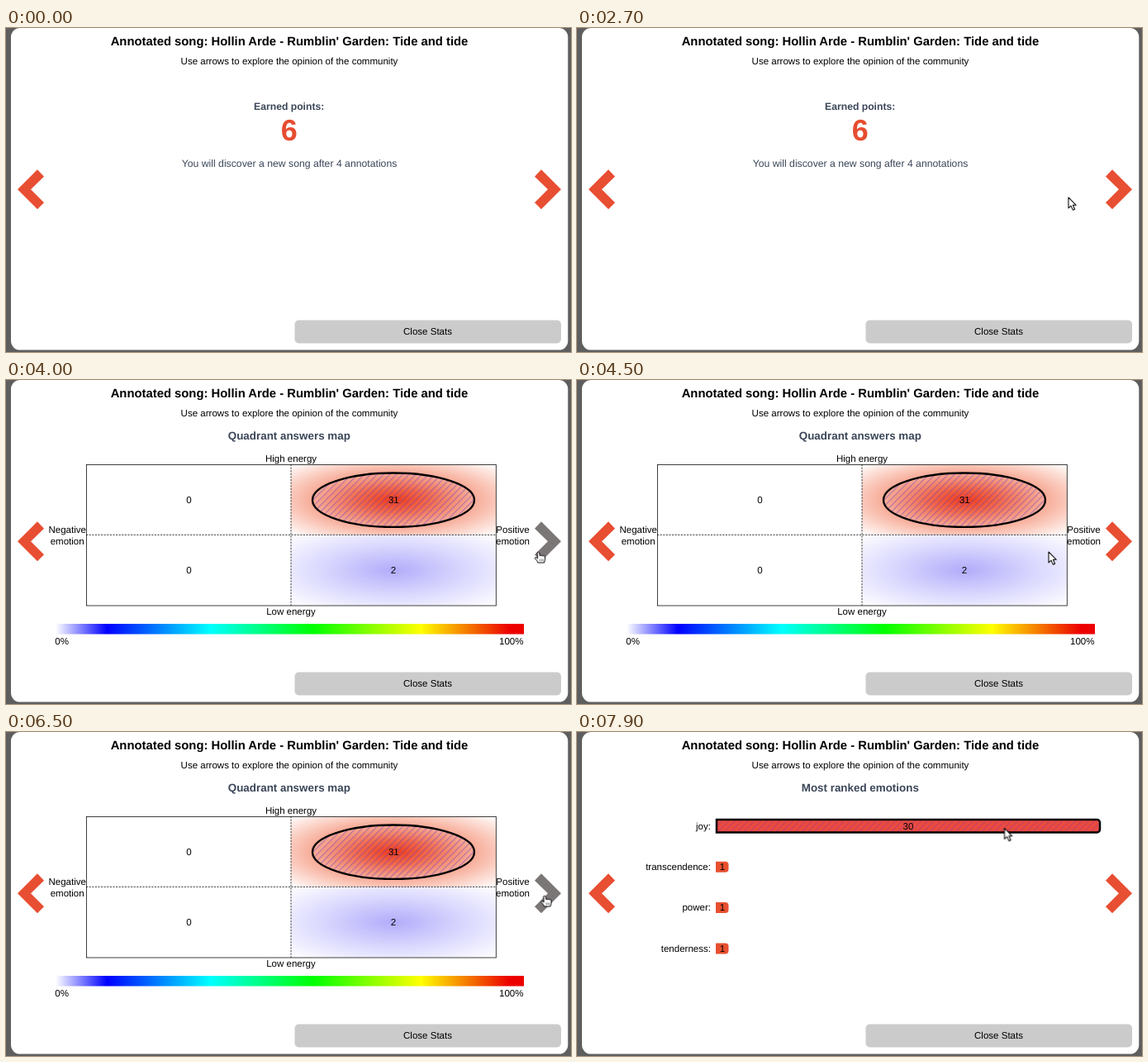
These frames come from a looping animation (684 by 392 pixels, 8 s). An HTML page:

```html
<!DOCTYPE html>
<html lang="en">
<head>
<meta charset="utf-8">
<title>Annotation stats</title>
<style>
  html, body { margin: 0; width: 100%; height: 100%; overflow: hidden; background: #5e5e5e; }
  svg { display: block; width: 684px; height: 392px; }
  text {
    font: 11.54px "Liberation Sans", Arial, sans-serif;
    text-anchor: middle;
    text-rendering: geometricPrecision;
  }
  .title { font-size: 14.83px; font-weight: bold; }
  .heading { font-size: 13.4px; font-weight: bold; fill: #3b4658; }
  .label { font-size: 12.2px; font-weight: bold; fill: #3b4658; }
  .note { font-size: 12.24px; fill: #3b4658; }
  .points { font-size: 36px; font-weight: bold; fill: #e64d30; }
  .end { text-anchor: end; }
  .start { text-anchor: start; }
  .chevron { fill: #e84e32; }
  .bar { fill: #e8502f; }

  /* Hard switches: slides, hover colour, pointer shape */
  .next, .slide, .pointer, .arrow, .hand { animation: 8s step-end infinite; }
  .slide { opacity: 0; }
  .points-slide { animation-name: points; }
  .map-slide { animation-name: map; }
  .rank-slide { animation-name: rank; }
  .next { animation-name: hover; }
  .pointer { animation-name: appear; }
  .arrow { animation-name: arrow; }
  .hand { animation-name: hand; }
  .path { animation: move 8s linear infinite; }

  @keyframes points { 0% { opacity: 1 } 50%, 100% { opacity: 0 } }
  @keyframes map { 0% { opacity: 0 } 50% { opacity: 1 } 83.75%, 100% { opacity: 0 } }
  @keyframes rank { 0% { opacity: 0 } 83.75%, 100% { opacity: 1 } }
  @keyframes appear { 0% { opacity: 0 } 27.5%, 100% { opacity: 1 } }
  @keyframes hover {
    0%, 53.75%, 88.75%, 100% { fill: #e84e32 }
    41.25%, 76.25% { fill: #7b7776 }
  }
  @keyframes arrow {
    0%, 53.75%, 88.75%, 100% { opacity: 1 }
    41.25%, 76.25% { opacity: 0 }
  }
  @keyframes hand {
    0%, 53.75%, 88.75%, 100% { opacity: 0 }
    41.25%, 76.25% { opacity: 1 }
  }
  @keyframes move {
    0%, 27.5% { transform: translate(560px, 248px) }
    32.5%, 35% { transform: translate(595px, 205px) }
    42.5%, 52.5% { transform: translate(644.5px, 208px) }
    56.25%, 71.25% { transform: translate(571px, 208px) }
    77.5%, 87.5% { transform: translate(652px, 198px) }
    90% { transform: translate(632px, 185px) }
    97.5%, 100% { transform: translate(517.5px, 116.5px) }
  }
</style>
</head>
<body>
<svg viewBox="0 0 684 392">
  <defs>
    <radialGradient id="hot" r=".707">
      <stop offset="0" stop-color="#ee3c1c"/>
      <stop offset=".25" stop-color="#f26a4c"/>
      <stop offset=".5" stop-color="#f6a18b"/>
      <stop offset=".75" stop-color="#fbd0c4"/>
      <stop offset="1" stop-color="#fff"/>
    </radialGradient>
    <radialGradient id="cool" r=".707">
      <stop offset="0" stop-color="#b2acfa"/>
      <stop offset=".5" stop-color="#dad8fe"/>
      <stop offset="1" stop-color="#fff"/>
    </radialGradient>
    <linearGradient id="scale">
      <stop offset="0" stop-color="#fff"/>
      <stop offset=".11" stop-color="#00f"/>
      <stop offset=".33" stop-color="#0ff"/>
      <stop offset=".55" stop-color="#0f0"/>
      <stop offset=".78" stop-color="#ff0"/>
      <stop offset=".97" stop-color="#ec0000"/>
    </linearGradient>
    <pattern id="hatch" width="5.5" height="5.5" patternUnits="userSpaceOnUse" patternTransform="rotate(45)">
      <path d="M2.5 0V5.5" stroke="#5a30c8" stroke-opacity=".6" stroke-width=".8"/>
    </pattern>
    <path id="chevron" d="M38 171.2L46 179.7L30 195.2L46 211.2L38 219.3L14 195.2Z"/>
    <path id="tag" d="M168 0h11.5a4 4 0 0 1 4 4v5a4 4 0 0 1-4 4H168z"/>
  </defs>

  <rect width="684" height="392" fill="#5e5e5e"/>
  <rect x="6" width="674.3" height="389.6" rx="11" fill="#fff"/>
  <text class="title" x="343" y="21">Annotated song: Hollin Arde - Rumblin' Garden: Tide and tide</text>
  <text x="343" y="44">Use arrows to explore the opinion of the community</text>
  <rect x="349.5" y="353.5" width="322.5" height="28" rx="5" fill="#cbcbcb"/>
  <text x="510.5" y="371">Close Stats</text>

  <g class="slide points-slide">
    <text class="label" x="342.7" y="99">Earned points:</text>
    <text class="points" x="342.7" y="136">6</text>
    <text class="note" x="343" y="168">You will discover a new song after 4 annotations</text>
  </g>

  <g class="slide map-slide">
    <text class="heading" x="342.8" y="72">Quadrant answers map</text>
    <rect x="345" y="102.5" width="248" height="85" fill="url(#hot)"/>
    <rect x="345" y="187.5" width="248" height="85" fill="url(#cool)"/>
    <ellipse cx="469" cy="145.2" rx="98" ry="32.7" fill="url(#hatch)" stroke="#000" stroke-width="2.3"/>
    <g fill="none" stroke="#111" stroke-width=".8">
      <rect x="97.5" y="102.5" width="495.8" height="170.5"/>
      <path d="M97 187.4H593M345 102V273" stroke-dasharray="2.2 1.4"/>
    </g>
    <text x="345" y="99">High energy</text>
    <text x="345" y="284">Low energy</text>
    <text x="74.2" y="185">Negative</text>
    <text x="74.2" y="199">emotion</text>
    <text x="613.5" y="185">Positive</text>
    <text x="613.5" y="199">emotion</text>
    <text x="221.4" y="149">0</text>
    <text x="469.3" y="149">31</text>
    <text x="221.4" y="234">0</text>
    <text x="469" y="234">2</text>
    <rect x="60" y="295" width="567" height="12.5" fill="url(#scale)"/>
    <text class="start" x="59.3" y="320">0%</text>
    <text class="end" x="626.5" y="320">100%</text>
  </g>

  <g class="slide rank-slide">
    <text class="heading" x="342.8" y="72">Most ranked emotions</text>
    <g stroke="#000" stroke-width="2.5">
      <path d="M169 106H629.5a3.5 3.5 0 0 1 3.5 3.5V118a3.5 3.5 0 0 1-3.5 3.5H169z" fill="#ec4a3e"/>
    </g>
    <path d="M170.3 107.3H631.7V120.2H170.3z" fill="url(#hatch)" opacity=".7"/>
    <g class="bar">
      <use href="#tag" y="156.7"/>
      <use href="#tag" y="206"/>
      <use href="#tag" y="255.5"/>
    </g>
    <text class="end" x="162" y="118">joy:</text>
    <text class="end" x="162" y="167">transcendence:</text>
    <text class="end" x="162" y="216">power:</text>
    <text class="end" x="162" y="266">tenderness:</text>
    <text x="401" y="118">30</text>
    <text x="176" y="167">1</text>
    <text x="176" y="216">1</text>
    <text x="176" y="266">1</text>
  </g>

  <use class="chevron" href="#chevron"/>
  <use class="next" href="#chevron" transform="matrix(-1 0 0 1 686 0)"/>

  <g class="pointer">
    <g class="path" fill="#fff" stroke="#000" stroke-linejoin="round">
      <path class="arrow" d="M0 0V13.6L3.2 10.7L5.6 16L8 15L5.7 9.8H9.8Z" transform="scale(.95)" stroke-width="1.1"/>
      <g class="hand" transform="scale(.9)">
        <path d="M-1.6 1.2Q0 -.8 1.4 1.2L2 5.2Q3.5 4 4.6 5.2Q6 4.2 7 5.4Q8.6 4.8 9 6.6V10.5L7.8 14.5H-.6L-2 11.6L-4.8 8.6Q-4.4 6.6-2.6 7.6L-1 8.8Z" stroke-width="1.1"/>
        <path d="M2.2 9.5V12.5M4.4 9.5V12.5M6.5 9.5V12.5" fill="none" stroke-width=".6"/>
      </g>
    </g>
  </g>
</svg>
</body>
</html>
```
